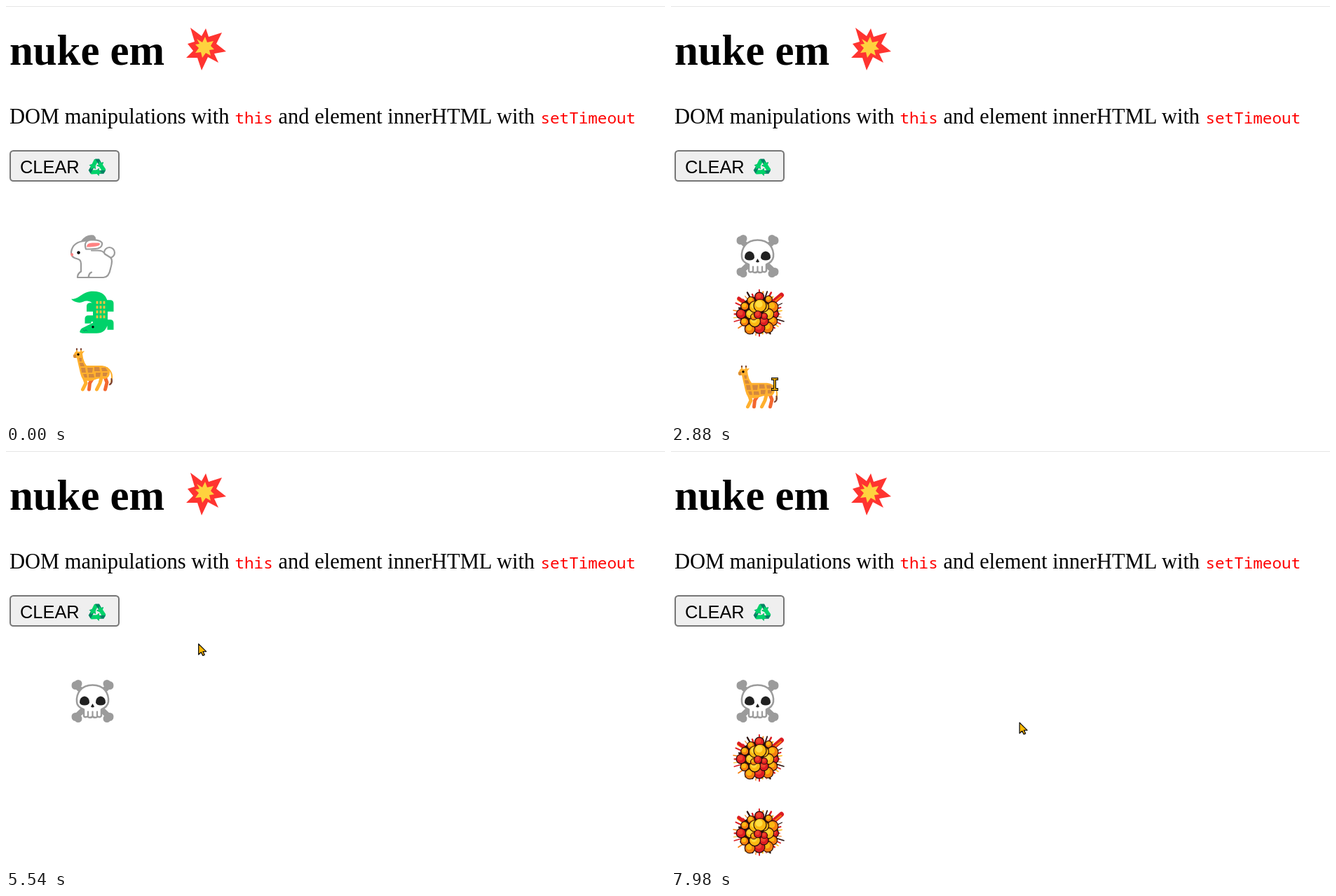
An HTML page for the animation above (8 s loop, 940 by 596 pixels).

```html
<!DOCTYPE html>
<html lang="en">
<head>
<meta charset="utf-8">
<title>nuke em</title>
<style>
  html, body { margin: 0; width: 100%; height: 100%; overflow: hidden; background: #fff; }
  svg { display: block; width: 940px; height: 596px; }
  .serif { font-family: "Liberation Serif", "Times New Roman", serif; }
  .code { font: 22.6px "Noto Sans Mono", monospace; fill: #f00; }
  .sans { font: 25.4px "Liberation Sans", Arial, sans-serif; }
</style>
</head>
<body>
<svg viewBox="0 0 940 596">
  <defs>
    <g id="rabbit" stroke-linejoin="round" stroke-linecap="round">
      <path d="M16 10Q24 0 34 2Q39 6 36 11L22 12Z" fill="#9b9b9b"/>
      <g fill="#fff" stroke="#9b9b9b" stroke-width="2.2">
        <circle cx="56.5" cy="27" r="7.5"/>
        <path d="M24 10Q4 11 2 26Q1 34 11 36Q16 37 16 43V54Q11 57 11 62.5H27Q27 56 31 55Q26 58 27 62.5H48Q56 62 58 50Q62 37 58 34L50 29Q48 24 40 24H31"/>
        <path d="M23 22Q19 10 30 9Q43 8 46 13Q47 19 40 21Q34 22 23 22Z"/>
      </g>
      <path d="M24 19Q24 13 32 13H41Q45 14 41 17Q34 19 24 19Z" fill="#ff8282"/>
      <path d="M1 29Q3 26 5 29Q5 33 2 32Z" fill="#ff8282"/>
      <circle cx="12.5" cy="27" r="2.2"/>
    </g>

    <g id="croc">
      <path fill="#00d26a" d="M2 12C14 13 17 1 33 1C47 1 54 8 54 20V48Q51 61 38 61H18Q11 60 17 54L33 46V24Q34 16 26 15C20 14 18 18 12 17Q5 16 2 12Z"/>
      <path d="M36 22H28.500V30M52 18H58V30M36 40H26V47M50 46H58V56" fill="none" stroke="#00d26a" stroke-width="9" stroke-linejoin="round"/>
      <path d="M39 15V41M44 15V41M49 15V41" stroke="#f9c23c" stroke-width="2.8" stroke-dasharray="4 2.800"/>
      <circle cx="33" cy="52" r="1.700"/>
      <path d="M19 56l2 2 2-2 2 2" fill="none" stroke="#008463"/>
    </g>

    <g id="giraffe" fill="none" stroke="#ffb02e" stroke-linecap="round" stroke-linejoin="round">
      <path d="M33 44L28.500 51L27.500 60M50 42L53 50L50.500 60" stroke="#f3672f" stroke-width="5"/>
      <path d="M20 42L23 51L18.500 60M46 40L43 51L38.500 60" stroke-width="5"/>
      <path d="M53 29Q63 36 59 49M10 3V9M16 3V9" stroke-width="2"/>
      <path d="M59.500 45Q61 51 57 53M10 2v1M16 2v1" stroke="#7d4533" stroke-width="2.200"/>
      <path fill="#ffb02e" stroke="none" d="M8 6H16L21 5L18 9Q19 20 24 26H46Q57 27 57 36Q57 43 50 45Q42 43 36 46Q27 50 19 46Q16 42 15 37L10 15H6Q4 13 5 11Z"/>
      <path fill="#d3883e" stroke="none" d="M13 15h4v5h-3zM14 22h5l2 5h-6zM16 29h6l1 7h-6zM25 29h8l-1 7h-6zM35 28h7l1 6h-8zM45 29h6l3 5h-8zM19 38h5l1 5h-4zM27 38h7l1 5h-8zM37 36h7l-1 6h-6zM47 36h7l-2 5h-5zM5 11l4-1v5H6z"/>
      <circle cx="12" cy="10" r="1.700" fill="#000" stroke="none"/>
    </g>

    <g id="skull" stroke="#9b9b9b" stroke-linecap="round" stroke-linejoin="round">
      <path d="M7 8L58 56M58 8L7 56" stroke-width="8"/>
      <path d="M8 10h0M12 7h0M57 10h0M53 7h0M8 54h0M12 57h0M57 54h0M53 57h0" stroke-width="11"/>
      <path d="M32.500 9C49 9 56 21 55 33Q54 40 45 44V53Q43 56 40 54Q36 57 32.500 54Q29 57 25 54Q21 56 20 53V44Q10 40 10 33C9 21 16 9 32.500 9Z" fill="#fff" stroke-width="2.500"/>
      <path d="M26 47v6M32.500 47v6M39 47v6" stroke-width="2.200"/>
      <g fill="#212121" stroke="none">
        <path d="M14 34Q14 26 21 25Q28 26 28 34Q27 38 21 38Q15 38 14 34ZM37 34Q37 26 44 25Q51 26 51 34Q50 38 44 38Q38 38 37 34Z"/>
        <path d="M32.500 35.500L35 40Q32.500 42 30 40Z"/>
      </g>
    </g>

    <g id="boom"></g>
    <path id="arrow" d="M.7.8V16L4.300 12.600L6.800 17.400L9.200 16.300L7 11.600H11.700Z" fill="#ffb900" stroke="#111" stroke-width="1.300" stroke-linejoin="round"/>
    <g id="beam" fill="none">
      <path d="M-5-7.500H5M-5 7.500H5M0-7.500V7.500" stroke="#111" stroke-width="4"/>
      <path d="M-4-7.500H4M-4 7.500H4M0-7.500V7.500" stroke="#ffb900" stroke-width="1.700"/>
    </g>
    <g id="ribbon">
      <path d="M-8-4L-4-12H3L-3-1.500Z" fill="#00d26a"/>
      <path d="M-3-12.500H3L6-7L9-8L6.500 0L-1-3L2-4.500Z" fill="#008463"/>
      <path d="M3-9L6-6.500L9-8L6.500 0L-1-2.500L2-4Z" fill="#00d26a"/>
    </g>
  </defs>

  <path d="M0 .5H940" stroke="#e6e6e6"/>
  <text class="serif" x="5" y="84" font-size="60.8" font-weight="bold">nuke em</text>
  <path fill="#ff3430" d="M263 31L279 43L285 32L289 44L308 38L300 54L314 65L297 68L303 81L288 73L279 92L273 74L257 74L267 64L259 54L269 51Z"/>
  <path fill="#ffd23e" d="M272 47L280 52L284 44L287 52L296 50L292 57L297 62L290 63L292 71L285 67L280 74L278 66L270 67L275 60L270 55L276 54Z"/>

  <g class="serif" font-size="30.5">
    <text x="5" y="168">DOM manipulations with</text>
    <text x="388.500" y="168">and element innerHTML with</text>
  </g>
  <text class="code" x="326.500" y="168">this</text>
  <text class="code" x="762.500" y="168">setTimeout</text>

  <rect id="button" x="6" y="207" width="155" height="43" rx="4.500" stroke="#767676" stroke-width="2"/>
  <text class="sans" x="20" y="239">CLEAR</text>
  <g transform="translate(130 231)">
    <use href="#ribbon"/>
    <use href="#ribbon" transform="rotate(120)"/>
    <use href="#ribbon" transform="rotate(240)"/>
  </g>

  <use class="row"/><use class="row"/><use class="row"/>
  <use id="cursor"/>
</svg>

<script>
const LOOP = 8000, TICK = 70, FUSE = 1000, ENTER = 310, RESET = 6300;
const LEFT = 91, TOP = 325.5, ROW = 81.25, BOOM_ROW = 106;
const animals = ['rabbit', 'croc', 'giraffe'];
const remains = ['skull', '', ''];

// time and row of each click on an animal
const clicks = [[560, 0], [2100, 1], [3460, 2], [6890, 0], [7210, 1], [7480, 2]];

// pointer stops: time, x, y
const stops = [
  [ENTER, 824, 557], [560, 128, 358], [770, 128, 358], [1050, 374, 386],
  [1330, 222, 374], [1610, 160, 415], [2100, 126, 438],
  [2800, 148, 540.5], [3290, 148, 540.5], [3430, 125, 456], [3710, 125, 456],
  [3990, 554, 414], [5180, 554, 414], [5530, 274, 275],
  [5950, 104, 229], [6370, 104, 229], [6650, 292, 300],
  [6890, 128, 360], [7210, 126, 460], [7480, 130, 565], [7910, 496.5, 387.5]
];

const $ = s => document.querySelector(s);
const rows = document.querySelectorAll('.row');
const button = $('#button'), cursor = $('#cursor');

function explosion() {
  let seed = 11, out = '';
  const rnd = (a, b) => a + (b - a) * (seed = seed * 16807 % 2147483647) / 2147483647;
  const red = '#dc1c22', orange = '#f77f0e', yellow = '#fdb913', dark = '#2a100c';
  const at = (a, r) => [38 + r * Math.cos(a), 36 + r * .92 * Math.sin(a)];
  const ray = (a, r, width, color) => {
    out += `<path d="M${at(a, 12)}L${at(a, r)}" stroke="${color}" stroke-width="${width}" stroke-linecap="round"/>`;
  };
  const ball = ([x, y], r, color, shine) => {
    out += `<circle cx="${x}" cy="${y}" r="${r}" fill="${color}" stroke="${dark}" stroke-width="1.2"/>` +
      `<circle cx="${x - r * .15}" cy="${y - r * .25}" r="${r * .55}" fill="${shine}"/>`;
  };
  for (let i = 0; i < 40; i++)
    ray(i * .157, rnd(29, 38), rnd(1, 2.6), [red, orange, dark, red, yellow][i % 5]);
  ray(-.75, 43, 7, red);
  ray(-.72, 41, 2, orange);
  ray(-2.45, 38, 5, red);
  out += `<ellipse cx="37" cy="34" rx="28" ry="23" fill="${dark}"/>`;
  for (let i = 0; i < 12; i++) {
    const hot = i % 3 === 0;
    ball(at(i * .524, rnd(21, 27)), rnd(4.5, 8), hot ? red : orange, hot ? '#f0432c' : yellow);
  }
  for (let i = 0; i < 6; i++)
    ball(at(i * 1.047, 13), rnd(5.5, 8.5), i === 1 ? red : yellow, i === 1 ? '#f0432c' : '#ffd83a');
  ball([39, 24], 9, yellow, '#ffdf45');
  ball([30, 40], 4.5, orange, yellow);
  ball([45, 39], 4.5, red, '#f0432c');
  ball([36, 37], 5.5, red, '#f0432c');
  $('#boom').innerHTML = out;
}

function pointAt(t) {
  const i = stops.findIndex(s => s[0] >= t);
  if (i < 1) return stops.at(i).slice(1);
  const [a, x, y] = stops[i - 1], [b, u, v] = stops[i];
  const k = (t - a) / (b - a);
  return [x + (u - x) * k, y + (v - y) * k];
}

function contents(t) {
  const state = [...animals];
  for (const [time, row] of clicks) {
    const cleared = time < RESET && t >= RESET;
    if (t >= time && !cleared) state[row] = t < time + FUSE ? 'boom' : remains[row];
  }
  return state;
}

function draw(now) {
  const t = now % LOOP;
  // the pointer is held between ticks, as a screen recorder catches it
  const [x, y] = pointAt(Math.floor(t / TICK) * TICK);

  let top = TOP, overText = false;
  contents(t).forEach((what, i) => {
    const boom = what === 'boom';
    rows[i].setAttribute('href', '#' + (what || 'none'));
    rows[i].setAttribute('transform', `translate(${boom ? LEFT - 3 : LEFT} ${boom ? top - 2.5 : top})`);
    if (what && !boom && x > 88 && x < 158 && y > top - 3 && y < top + 70) overText = true;
    if (what) top += boom ? BOOM_ROW : ROW;
  });

  const hover = x > 5 && x < 162 && y > 206 && y < 250 && t < RESET;
  button.setAttribute('fill', hover ? '#e5e5e5' : '#efefef');
  cursor.setAttribute('visibility', t < ENTER ? 'hidden' : 'visible');
  cursor.setAttribute('href', overText ? '#beam' : '#arrow');
  cursor.setAttribute('transform', `translate(${x} ${y})`);
}

explosion();
const start = performance.now();
(function frame() {
  draw(performance.now() - start);
  requestAnimationFrame(frame);
})();
</script>
</body>
</html>
```
